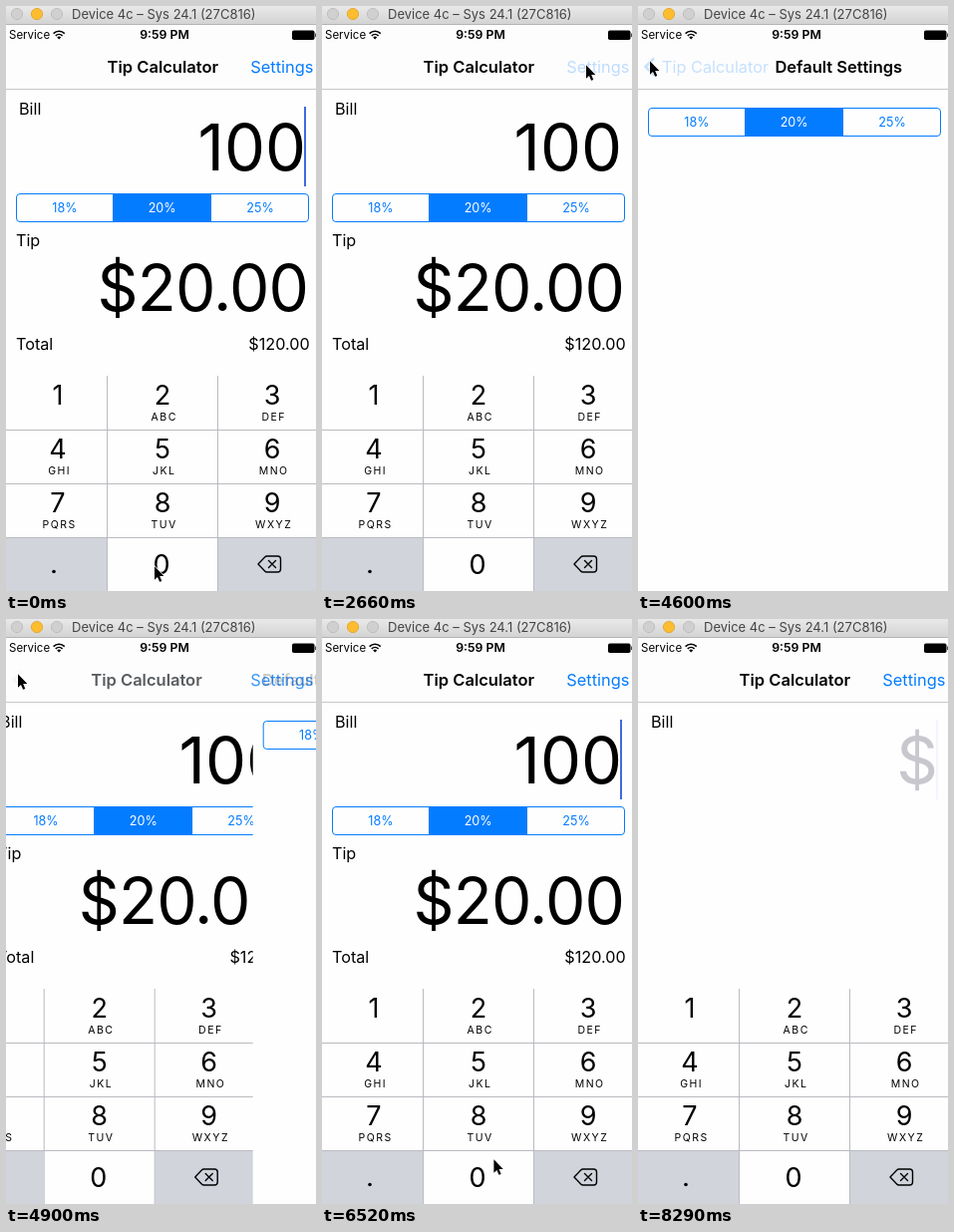
Animation of 311x587 px, one loop 8440 ms. Source, as an HTML page:

```html
<!DOCTYPE html>
<html lang="en">
<head>
<meta charset="utf-8">
<title>Tip Calculator</title>
<style>
  html, body { margin: 0; width: 100%; height: 100%; overflow: hidden; background: #fff; }
  svg { display: block; width: 100%; height: 100%; font-family: Inter, "Open Sans", sans-serif; font-size: 16.2px; }
  .blue { fill: #047cff; }
  .bold { font-weight: 600; font-size: 16.5px; }
  .mid { text-anchor: middle; }
  .end { text-anchor: end; }
  .seg { font-size: 12.6px; }
  .bill { font-size: 65px; }
  .tip { font-size: 64px; letter-spacing: -.8px; }
  .digit { font-size: 27px; }
  .abc { font-size: 10.5px; letter-spacing: 1.5px; }
  .rule { fill: none; stroke: #b9bbc0; }
</style>
</head>
<body>
<svg viewBox="0 0 311 587">
  <defs>
    <linearGradient id="chrome" x2="0" y2="1">
      <stop stop-color="#e9e9e9"/><stop offset="1" stop-color="#d2d2d2"/>
    </linearGradient>
    <g id="choice">
      <rect x="10.5" y=".5" width="293" height="28" rx="3.5" fill="none" stroke="#047cff"/>
      <path class="blue" d="M107 0h99v29h-99z"/>
      <g class="seg mid" fill="#047cff">
        <text x="59" y="19">18%</text>
        <text x="156.7" y="19" fill="#fff">20%</text>
        <text x="255" y="19">25%</text>
      </g>
    </g>
  </defs>
  <rect width="311" height="587" fill="#fefefe"/>

  <g id="main">
    <text x="13" y="109">Bill</text>
    <text id="bill" class="bill end" x="301" y="165"></text>
    <rect id="caret" x="299" y="101" width="2" height="80" fill="#4169e1"/>
    <g id="result">
      <use href="#choice" y="188"/>
      <text x="10" y="241">Tip</text>
      <text id="tip" class="tip end" x="303.2" y="306"></text>
      <text x="10" y="345">Total</text>
      <text id="total" class="end" x="304.7" y="344.5"></text>
    </g>
  </g>

  <g id="prefs">
    <rect y="84" width="311" height="503" fill="#fefefe"/>
    <use href="#choice" y="102"/>
  </g>

  <g id="pad">
    <rect y="371" width="311" height="216" fill="#fefefe"/>
    <path fill="#d1d4db" d="M0 534h101v53H0z"/>
    <rect id="erase" x="213" y="534" width="98" height="53"/>
    <path class="rule" d="M101.5 371V587M212.5 371V587M0 425.5H311M0 479.5H311M0 533.5H311"/>
    <g id="keys" class="mid"></g>
    <circle cx="48" cy="567.5" r="1.8"/>
    <path d="M253 560L259.6 553Q260.5 552 262 552H272.5Q275.5 552 275.5 555V565Q275.5 568 272.5 568H262Q260.5 568 259.6 567ZM263.5 556.5L270.5 563.5M270.5 556.5L263.5 563.5"
      fill="none" stroke="#000" stroke-width="1.4" stroke-linejoin="round" stroke-linecap="round"/>
  </g>

  <rect y="19" width="311" height="64" fill="#fdfdfd"/>
  <path class="rule" d="M0 83.5H311" stroke-opacity=".8"/>
  <text id="title" class="bold mid" x="157.3" y="67">Tip Calculator</text>
  <text id="open" class="blue" x="245.3" y="67" font-size="16.4">Settings</text>
  <g id="back">
    <path d="M16 52.5L7.5 61L16 69.5" fill="none" stroke="#047cff" stroke-width="2.6"/>
    <text id="backText" class="blue" x="24" y="67" font-size="16.3">Tip Calculator</text>
  </g>
  <text id="title2" class="bold mid" x="201.3" y="67">Default Settings</text>

  <g font-size="11.5">
    <text x="3" y="33">Service</text>
    <text class="mid" x="159" y="33.3" font-size="12.3" font-weight="600">9:59 PM</text>
    <path d="M47.6 27.6A8 8 0 0 1 58.8 27.6M49.8 29.9A4.9 4.9 0 0 1 56.6 29.9" fill="none" stroke="#000" stroke-width="1.6"/>
    <path d="M51.2 31.4A2.8 2.8 0 0 1 55.2 31.4L53.2 33.6Z"/>
    <rect x="287" y="24.5" width="22.5" height="9.5" rx="1.8"/>
    <path d="M310.3 27.5h.7v3.6h-.7z"/>
  </g>

  <rect width="311" height="19" fill="url(#chrome)"/>
  <path d="M0 18.5H311" stroke="#b4b4b4"/>
  <g fill="#d0d0d0" stroke="#b8b8b8" stroke-width=".8">
    <circle cx="11" cy="8" r="5.6"/>
    <circle cx="31" cy="8" r="5.6" fill="#fdbd2f" stroke="#dfa023"/>
    <circle cx="51" cy="8" r="5.6"/>
  </g>
  <text x="66" y="13" font-size="13" fill="#444">Device 4c – Sys 24.1 (27C816)</text>

  <path id="arrow" d="M1 1.2V14.8L4 12L6.1 16.8L8.3 15.9L6.2 11H10.4Z" stroke="#fff" stroke-width="1.4" paint-order="stroke"/>
</svg>
<script>
const LOOP = 8440, TICKS = 57;
const OPEN = 18, BACK = 31, RETURNED = 35; // ticks of the navigation taps
const ERASE = [46, 48, 51];                // ticks of the backspace taps

const $ = id => document.getElementById(id);
const move = (id, x, y = 0) => $(id).setAttribute('transform', `translate(${x} ${y})`);
const fade = (id, o) => $(id).setAttribute('opacity', o);
const money = n => '$' + n.toFixed(2);
const clamp = v => Math.min(1, Math.max(0, v));
const smooth = f => f * f * (3 - 2 * f);
const easeOut = f => 1 - (1 - clamp(f)) ** 3;

const label = (cls, x, y, s) => `<text class="${cls}" x="${x}" y="${y}">${s}</text>`;
const letters = ['', 'ABC', 'DEF', 'GHI', 'JKL', 'MNO', 'PQRS', 'TUV', 'WXYZ'];
$('keys').innerHTML = letters.map((abc, i) => {
  const x = [52, 157, 267][i % 3], y = 400 + 54 * Math.floor(i / 3);
  return label('digit', x, y, i + 1) + label('abc', x + 1.7, y + 16, abc);
}).join('') + label('digit', 156, 570, 0);

// Pointer trips between the controls
const trips = [
  { from: 0, to: 2, x: 186, y: 386 },
  { from: 3, to: 9, x: 35, y: 176 },
  { from: 11, to: OPEN, x: 264, y: 58 },
  { from: 21, to: 25, x: 11, y: 54 },
  { from: 33, to: RETURNED, x: 12, y: 74 },
  { from: RETURNED, to: 40, x: 97, y: 528 },
  { from: 41, to: 48, x: 286, y: 561 },
  { from: 50, to: 53, x: 325, y: 600 }
];
function pointer(k) {
  let x = 148, y = 561;
  for (const trip of trips) {
    const f = smooth(clamp((k - trip.from) / (trip.to - trip.from)));
    x += (trip.x - x) * f;
    y += (trip.y - y) * f;
  }
  return [x, y];
}

// Blinks every 7 ticks, starting over with each edit
function caret(k, edited) {
  if (k >= OPEN && k < RETURNED) return 0;
  return clamp(1 - ((k - edited) % 7 - 3) * .47);
}

function draw(k) {
  const leaving = k >= OPEN && k < BACK;
  const p = k < BACK ? easeOut((k - 20.6) / 4.4) : 1 - easeOut((k - 31.6) / 3.4);
  move('main', -93 * p);
  move('prefs', 311 * (1 - p));
  move('pad', -311 * p);

  move('title', -80 * p);
  fade('title', (1 - p) ** 2);
  move('title2', 150 * (1 - p));
  fade('title2', p);
  move('backText', 78 * (1 - p));
  fade('back', p * (k < BACK ? 1 : .22));
  fade('open', (1 - p) * (leaving ? .25 : 1));

  const taps = ERASE.filter(t => t <= k);
  const bill = Math.floor(100 / 10 ** taps.length);
  $('bill').textContent = bill || '$';
  $('bill').setAttribute('fill', bill ? '#000' : '#c7c7cd');
  $('tip').textContent = money(bill * .2);
  $('total').textContent = money(bill * 1.2);
  fade('result', bill ? 1 : clamp((53 - k) * .35));
  fade('caret', caret(k, taps.pop() || 0));
  $('erase').setAttribute('fill', ERASE.includes(k) ? '#fefefe' : '#d1d4db');
  move('arrow', ...pointer(k));
}

// The screen refreshes in even ticks, so time is quantised
const start = performance.now();
function loop() {
  const t = (performance.now() - start) % LOOP;
  draw(Math.floor((t + 6) * TICKS / LOOP) % TICKS);
  requestAnimationFrame(loop);
}
loop();
</script>
</body>
</html>
```
